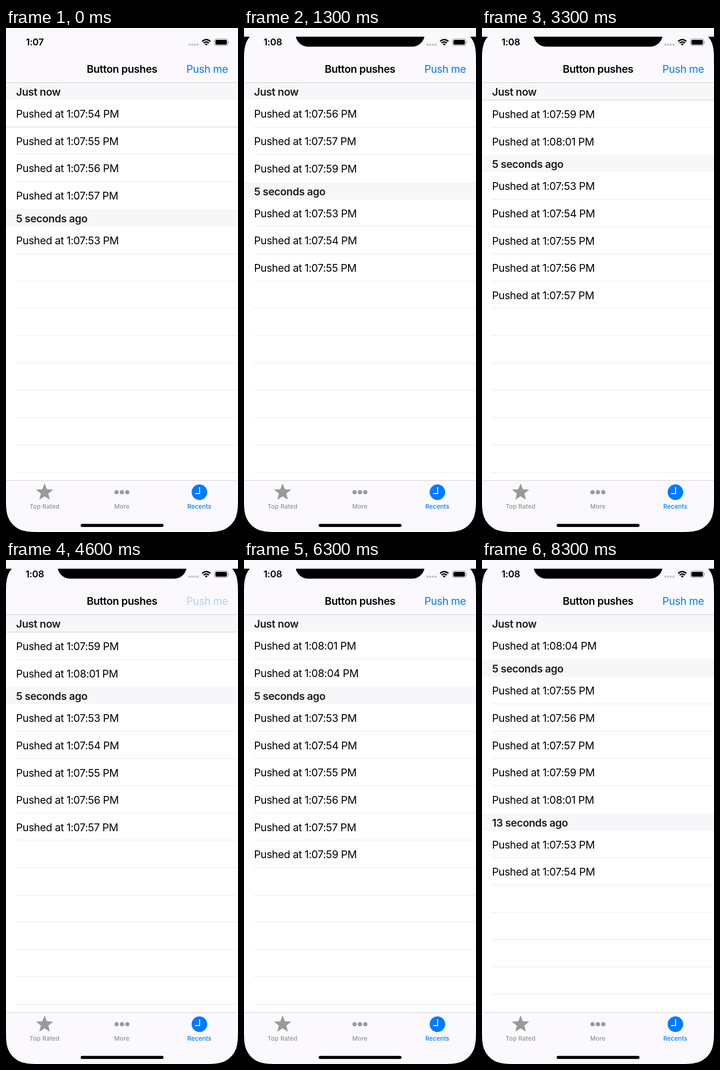
Recreate the animation shown at these times as an HTML page. Size 508 px wide and 1102 px high, loop 8800 ms.

```html
<!DOCTYPE html>
<html lang="en">
<head>
<meta charset="utf-8">
<title>Button pushes</title>
<style>
  html, body { margin: 0; width: 100%; height: 100%; overflow: hidden; background: #fff; }
  svg { display: block; width: 100%; height: 100%; }
  text { font: 23px Inter, Roboto, sans-serif; letter-spacing: -.44px; }
  .bold { font-weight: 600; }
  .mid { text-anchor: middle; }
  .tab { font-size: 13.3px; font-weight: 500; letter-spacing: .2px; fill: #929294; }
  .time { font-size: 20.5px; font-weight: 600; letter-spacing: -.3px; }
  .blue { fill: #007aff; }
  .bar { fill: #fbf9fd; }
  .head rect { fill: #f7f6f9; }
  .head text { font-weight: 600; fill: #1c1b1f; }
</style>
</head>
<body>
<svg viewBox="0 0 508 1102">
  <defs>
    <path id="corner" d="M0 0H82.5C58.8 0 46.9 0 34.1 4C20.1 9.1 9.1 20.1 4 34.1C0 46.9 0 58.8 0 82.5Z"/>
    <clipPath id="below"><rect y="19" width="508" height="100"/></clipPath>
  </defs>
  <g id="list"></g>

  <rect class="bar" width="508" height="119"/>
  <rect y="119" width="508" height="1" fill="#cac9cc"/>
  <text class="bold mid" x="254" y="98">Button pushes</text>
  <text id="push" class="blue" x="486" y="98" text-anchor="end">Push me</text>

  <g id="notch" clip-path="url(#below)">
    <use href="#corner"/>
    <use href="#corner" transform="translate(508) scale(-1 1)"/>
    <path d="M113 13.7A27 27 0 0 0 140 40.7H368.5A27 27 0 0 0 395.5 13.7Z"/>
  </g>
  <text id="clock" class="time mid" x="63" y="38"></text>
  <g fill="#c3c2c5">
    <circle cx="401.5" cy="36.5" r="2.4"/><circle cx="407.5" cy="36.5" r="2.4"/>
    <circle cx="413.5" cy="36.5" r="2.4"/><circle cx="419.5" cy="36.5" r="2.4"/>
  </g>
  <g fill="none" stroke="#000" stroke-width="3">
    <path d="M429.5 29.3Q438.5 21.2 447.5 29.3M432.8 33Q438.5 28 444.2 33"/>
    <path d="M435.3 35.2Q438.5 32.8 441.7 35.2L438.5 38.6Z" fill="#000" stroke="none"/>
  </g>
  <rect x="456.6" y="23.9" width="29" height="14.6" rx="4.4" fill="none" stroke="#8f8e91" stroke-width="1.2"/>
  <rect x="458.6" y="25.9" width="25" height="10.6" rx="2.7"/>
  <path d="M487 28.5Q489.3 31.2 487 34Z" fill="#8f8e91"/>

  <rect class="bar" y="989" width="508" height="113"/>
  <rect y="989" width="508" height="1" fill="#cac9cc"/>
  <path id="star" fill="#9a999c" stroke="#9a999c" stroke-linejoin="round"/>
  <g fill="#9a999c">
    <circle cx="242" cy="1015" r="4.7"/><circle cx="253.8" cy="1015" r="4.7"/><circle cx="265.6" cy="1015" r="4.7"/>
  </g>
  <circle class="blue" cx="423.5" cy="1015" r="17"/>
  <path d="M424 1004V1018H414" fill="none" stroke="#fff" stroke-width="2"/>
  <text class="tab mid" x="84.3" y="1051">Top Rated</text>
  <text class="tab mid" x="253.8" y="1051">More</text>
  <text class="tab mid" x="423.3" y="1051" style="fill:#007aff">Recents</text>
  <use href="#corner" transform="translate(0 1102) scale(1 -1)"/>
  <use href="#corner" transform="translate(508 1102) scale(-1)"/>
  <rect x="163.5" y="1084.2" width="181.5" height="6.8" rx="3.4"/>
</svg>

<script>
const LOOP = 8800, STEP = 100;
const TOP = 119.4, HEAD = 38, ROW = 59.7, TAB = 989;
const TITLES = ['Just now', '5 seconds ago', '13 seconds ago'];

// Eased progress on each successive step of a table update
const MOVE = [.01, .35, .83, 1], PUSH = [.11, .6, .95, 1], SHORT = [.01, .25, .7, .99];

// Start time, easing and resulting rows (push seconds), sections split by "|"
const START = '54 55 56 57|53';
const UPDATES = [
  [0, MOVE, '55 56 57|53 54'],
  [300, PUSH, '55 56 57 59|53 54'],
  [1000, MOVE, '56 57 59|53 54 55'],
  [2000, MOVE, '57 59|53 54 55 56'],
  [2400, PUSH, '57 59 01|53 54 55 56'],
  [3000, SHORT, '59 01|53 54 55 56 57'],
  [4800, PUSH, '59 01 04|53 54 55 56 57'],
  [6000, MOVE, '01 04|53 54 55 56 57 59'],
  [7000, MOVE, '01 04|54 55 56 57 59|53'],
  [8000, MOVE, '04|55 56 57 59 01|53 54']
];
const TAPS = [100, 2200, 4600];

const $ = id => document.getElementById(id);
const mix = (a, b, p) => a + (b - a) * p;

function layout(state) {
  const items = new Map();
  let y = TOP;
  state.split('|').forEach((rows, section) => {
    items.set('h' + section, { head: true, label: TITLES[section], y });
    y += HEAD;
    rows.split(' ').forEach((sec, index) => {
      const label = `Pushed at 1:${sec < 50 ? '08' : '07'}:${sec} PM`;
      items.set(`${section}:${sec}`, { label, index, y });
      y += ROW;
    });
  });
  return { items, end: y };
}

function line(y, full) {
  return `<rect x="${full ? 0 : 22}" y="${Math.round(y) - 1}" width="508" height="1" fill="${full ? '#c6c6c8' : '#e4e4e6'}"/>`;
}

// Rows stop short of the separator, which belongs to the row below
function cell({ head, label, index }, y, alpha, full) {
  const top = Math.round(y), height = head ? HEAD : 58;
  return `<g opacity="${alpha}" class="${head ? 'head' : ''}">
    <rect y="${top}" width="508" height="${height}" fill="#fff"/>
    <text x="22" y="${top + (head ? 29 : 39)}">${label}</text>
    ${full || index > 0 ? line(y, full) : ''}</g>`;
}

function table(from, to, p) {
  const a = layout(from), b = layout(to);
  let fading = '', rows = '', heads = '', blanks = '';
  for (const [key, item] of a.items)
    if (!b.items.has(key)) fading += cell(item, item.y, 1 - p);
  for (const [key, item] of b.items) {
    const old = a.items.get(key);
    if (!old) {
      fading += cell(item, item.y, p);
      continue;
    }
    const exposed = p < 1 && item.index === 0 && old.index > 0;
    const svg = cell(item, mix(old.y, item.y, p), 1, exposed);
    if (item.head) heads += svg; else rows += svg;
  }
  for (let y = mix(a.end, b.end, p); y < TAB; y += ROW) blanks += line(y);
  return fading + rows + heads + blanks;
}

function draw(t) {
  const i = UPDATES.findLastIndex(u => u[0] <= t);
  const [start, ease, state] = UPDATES[i];
  const p = ease[Math.min((t - start) / STEP, 3)];
  $('list').innerHTML = table(i ? UPDATES[i - 1][2] : START, state, p);
  $('push').style.opacity = TAPS.some(tap => t >= tap && t < tap + 200) ? .3 : 1;
  $('clock').textContent = t < 500 ? '1:07' : '1:08';
  $('notch').style.display = t < 100 ? 'none' : '';
}

$('star').setAttribute('d', 'M' + Array.from({ length: 10 }, (_, k) => {
  const r = k % 2 ? 8 : 18.6, angle = k * Math.PI / 5;
  return [84.5 + r * Math.sin(angle), 1015.5 - r * Math.cos(angle)].map(v => v.toFixed(1));
}).join('L') + 'Z');

const begin = performance.now();
let shown = -1;
function tick() {
  const t = Math.floor((performance.now() - begin) % LOOP / STEP) * STEP;
  if (t !== shown) draw(shown = t);
  requestAnimationFrame(tick);
}
tick();
</script>
</body>
</html>
```
